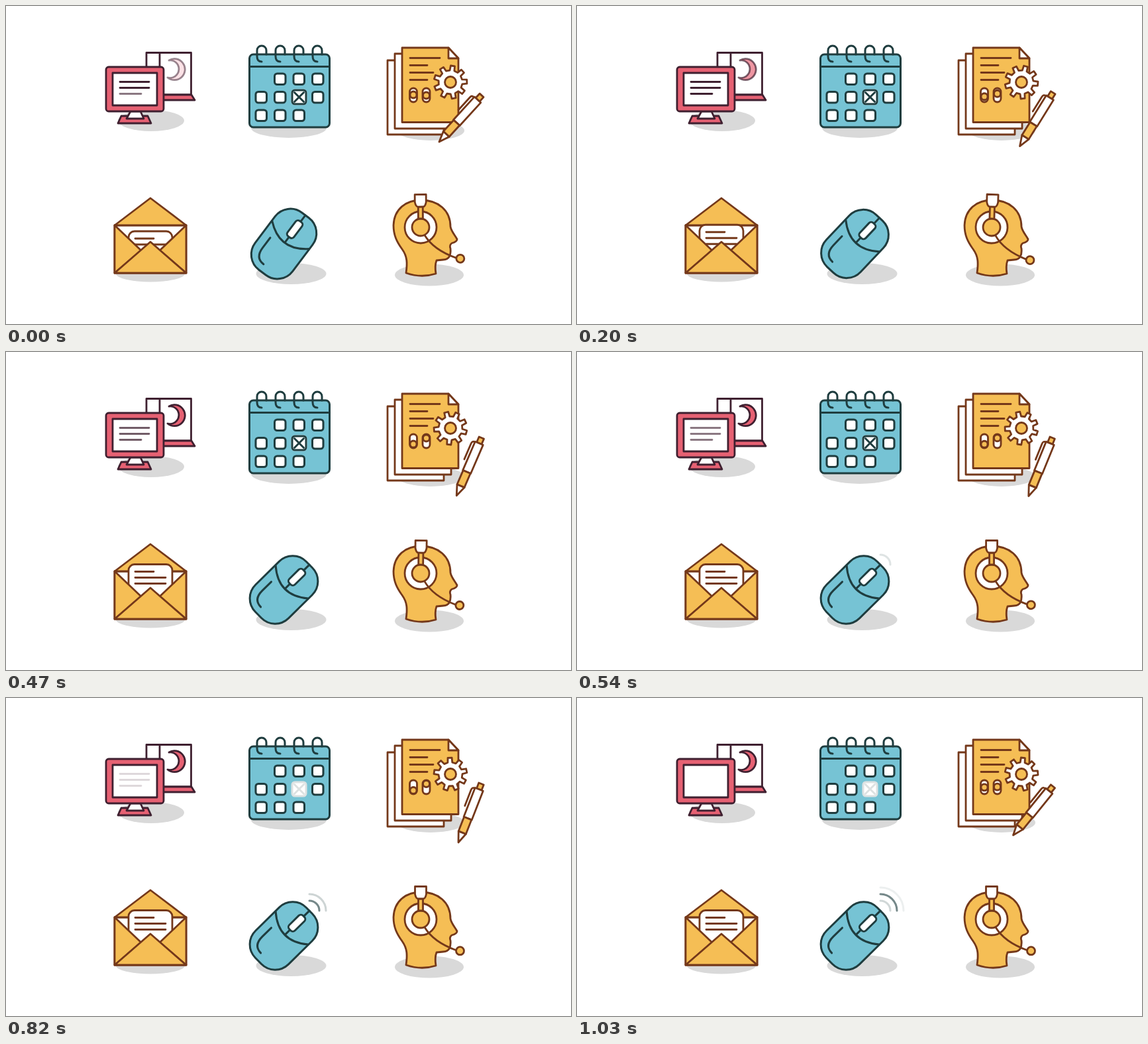
Recreate the animation shown at these times as an HTML page. Size 853 by 480 pixels, loop 1100 ms.

```html
<!DOCTYPE html>
<html>
<head>
<meta charset="utf-8">
<style>
  html, body { margin: 0; width: 100%; height: 100%; overflow: hidden; background: #fff; }
  svg { display: block; width: 853px; height: 480px; stroke-linecap: round; stroke-linejoin: round; }
  .shadow { fill: #d9d9d9; stroke: none; }
  .plum { stroke: #3f2030; stroke-width: 2.8; }
  .teal { stroke: #1f3d3f; stroke-width: 3; }
  .brown { stroke: #74381a; stroke-width: 2.8; }
  .blank { fill: #fff; stroke: #fff; }
  .w { fill: #fff; }
  .p { fill: #e66173; }
  .t { fill: #76c3d4; }
  .o { fill: #f5be55; }
  .n { fill: none; }
</style>
</head>
<body>
<svg viewBox="0 0 853 480">
  <!-- computers -->
  <g class="plum">
    <ellipse class="shadow" cx="219" cy="173" rx="50" ry="16"/>
    <path class="w" d="M212 70.5H279.5V134H212ZM232 70.5V134"/>
    <path class="p" d="M212 134H280L285 142H212Z"/>
    <path class="p" id="moon" d="M246 82A16 16 0 1 1 244 108A13.3 13.3 0 1 0 246 82Z"/>
    <path class="p" d="M174 166H214L219 177H169Z"/>
    <path class="w" d="M188 159H203L208 170H182Z"/>
    <rect class="p" x="151" y="92" width="87" height="67" rx="4"/>
    <path class="w" d="M161 101H228V150H161Z"/>
    <path id="lines" d="M172 114.5H216M172 123.5H216"/>
    <path id="lastLine" d="M172 132.5H204"/>
  </g>

  <!-- calendar -->
  <g class="teal">
    <ellipse class="shadow" cx="427" cy="184" rx="57" ry="15"/>
    <rect class="t" x="367.5" y="73" width="121" height="110" rx="6"/>
    <path d="M368 91.5H488"/>
    <g id="rings" class="n"></g>
    <g id="cells" class="w"></g>
    <rect class="blank" x="432" y="127" width="21" height="21" rx="4"/>
    <g id="mark" class="n">
      <rect x="432" y="127" width="21" height="21" rx="4"/>
      <path d="M435.500 130.500L449.500 144.500M449.500 130.500L435.500 144.500"/>
    </g>
  </g>

  <!-- papers, gear and pen -->
  <g class="brown">
    <ellipse class="shadow" cx="641" cy="188" rx="51" ry="15"/>
    <path class="w" d="M576 82H661V194H576Z"/>
    <path class="w" d="M587 72H672V185H587Z"/>
    <path class="o" d="M598 63H668L683 79V175.500H598Z"/>
    <path class="w" d="M668 63V79H683Z"/>
    <path d="M610 78.500H655M610 89.500H636M610 100.500H645M610 111.500H636"/>
    <rect class="w" x="609.500" y="124" width="11" height="21" rx="5.500"/>
    <circle class="o" id="knobA" cx="615" r="5"/>
    <rect class="w" x="629" y="124" width="11" height="21" rx="5.500"/>
    <circle class="o" id="knobB" cx="634.500" r="5"/>
    <path class="w" id="gear"/>
    <circle class="o" cx="671" cy="115" r="8.500"/>
    <g id="pen">
      <path class="n" d="M-6 -85Q-11 -86 -11 -81V-55"/>
      <path class="o" d="M-4 -86V-95H4V-86Z"/>
      <path class="w" d="M-6.500 -39V-86H6.500V-39Z"/>
      <path class="w" d="M0 0L-6 -16H6Z"/>
      <path class="o" d="M-6 -16V-39H6V-16Z"/>
    </g>
  </g>

  <!-- envelope -->
  <g class="brown">
    <ellipse class="shadow" cx="218" cy="404" rx="52" ry="12.500"/>
    <path class="w" d="M164 331H272V403H164Z"/>
    <path class="o" d="M164 331L218 290L272 331Z"/>
    <g id="letter">
      <rect class="w" x="185" width="66" height="55" rx="9"/>
      <path d="M195 11H223M195 20H241M195 29H241"/>
    </g>
    <path class="o" d="M164 331L204 369L164 403ZM272 331L232 369L272 403Z"/>
    <path class="o" d="M164 403L218 356L272 403Z"/>
  </g>

  <!-- mouse -->
  <g class="teal">
    <ellipse class="shadow" cx="430.500" cy="404" rx="53" ry="16"/>
    <g id="mouse">
      <rect class="t" x="-35.500" y="-54" width="71" height="108" rx="29"/>
      <path class="n" d="M-35 -17Q0 13 35 -17M0 -2V-54M-22 5V24Q-22 43 -6 43"/>
      <rect class="w" x="-6" y="-42" width="12" height="29" rx="4.500"/>
    </g>
    <g id="waves" class="n"></g>
  </g>

  <!-- head with headset -->
  <g class="brown">
    <ellipse class="shadow" cx="639" cy="406" rx="52" ry="16.500"/>
    <path class="o" d="M604 403C606 388 606 378 598 367C590 356 585 346 585 331C586 306 604 293 627 293C653 293 671 309 671 333C672 340 678 346 681 352Q681 356 673 358Q669 361 671 366C672 376 669 383 660 383L650 384Q647 392 649 404Q627 411 604 403Z"/>
    <g id="headset">
      <circle class="w" cx="626" cy="334" r="24"/>
      <circle class="o" cx="626" cy="334" r="13"/>
      <path class="o" d="M622.500 303V321H629.500V303Z"/>
      <path class="w" d="M617.500 284.500H634.500V296Q633 303 630 303H622Q619 303 617.500 296Z"/>
      <path class="n" d="M632 346Q645 368 679 380.500"/>
      <circle class="o" cx="685.500" cy="381.700" r="6"/>
    </g>
  </g>
</svg>
<script>
const LOOP = 1100;
const $ = id => document.getElementById(id);
const set = (id, name, value) => $(id).setAttribute(name, value);

const ramp = (t, from, to) => Math.min(1, Math.max(0, (t - from) / (to - from)));
const mix = (a, b, p) => a + (b - a) * p;
const smooth = p => p * p * (3 - 2 * p);
const out = p => 1 - (1 - p) ** 3;

$('rings').innerHTML = [0, 1, 2, 3].map(i =>
  `<path d="M${393 + 28 * i} 73v-6a7 7 0 0 0 -14 0v9q0 8 7 8"/>`).join('');

let cells = '';
for (let row = 0; row < 3; row++) {
  for (let col = 0; col < 4; col++) {
    const empty = row + col === 0 || row === 2 && col === 3;
    const marked = row === 1 && col === 2;
    if (!empty && !marked) {
      cells += `<rect x="${377 + 28.5 * col}" y="${102 + 27.5 * row}" width="16.5" height="16.5" rx="4"/>`;
    }
  }
}
$('cells').innerHTML = cells;

$('waves').innerHTML = [15, 25, 35].map((r, i) =>
  `<path id="wave${i}" d="M458 ${321 - r}a${r} ${r} 0 0 1 ${r} ${r}"/>`).join('');

function gearPath(turn) {
  const points = [];
  for (let i = 0; i < 9; i++) {
    for (const [offset, r] of [[-11, 18], [-7, 25], [7, 25], [11, 18]]) {
      const a = (i * 40 + offset + turn) * Math.PI / 180;
      points.push(`${671 + r * Math.cos(a)} ${115 + r * Math.sin(a)}`);
    }
  }
  return `M${points.join('L')}Z`;
}

// The picture changes every 70 ms, with a longer hold at 0 and at 340.
function hold(t) {
  const step = from => from + 70 * Math.floor((t - from) / 70);
  return t < 130 ? 0 : t < 470 ? Math.min(340, step(130)) : step(470);
}

function draw(t) {
  const lines = (1 - ramp(t, 340, 1030)) ** 1.5;
  set('lines', 'opacity', lines);
  set('lastLine', 'opacity', lines * mix(.6, 1, ramp(t, 0, 200)));

  const moon = ramp(t, 0, 340);
  set('moon', 'fill-opacity', mix(.18, 1, moon));
  set('moon', 'stroke-opacity', mix(.52, 1, moon ** 2));

  set('mark', 'opacity', mix(1, .15, out(ramp(t, 540, 820))));

  // 1 is the pen leaning over the paper, 0 is upright.
  const lean = (1 - ramp(t, 0, 680)) ** 2 + smooth(ramp(t, 820, LOOP));
  set('pen', 'transform',
    `translate(${mix(683, 654, lean)} ${mix(218, 205, lean)}) rotate(${mix(21.3, 42.4, lean)})`);
  const slide = 10 - 5.5 * lean;
  set('knobA', 'cy', 129.5 + slide);
  set('knobB', 'cy', 139.5 - slide);
  set('gear', 'd', gearPath(40 * t / LOOP - 2));

  set('letter', 'transform', `translate(0 ${mix(340, 320.5, smooth(ramp(t, 0, 400)))})`);
  set('mouse', 'transform', `translate(419.5 359) rotate(${mix(37, 45.5, out(ramp(t, 0, 540)))})`);
  for (let i = 0; i < 3; i++) {
    set('wave' + i, 'opacity', .62 * Math.sin(Math.PI * ramp(t, 495 + 255 * i, 1095 + 255 * i)));
  }

  const shake = 1.8 * (1 - ramp(t, 200, 680)) * Math.cos(2 * Math.PI * (t - 200) / 280);
  set('headset', 'transform', `rotate(${shake} 626 334)`);
}

const start = performance.now();
function tick() {
  draw(hold((performance.now() - start) % LOOP));
  requestAnimationFrame(tick);
}
tick();
</script>
</body>
</html>
```
